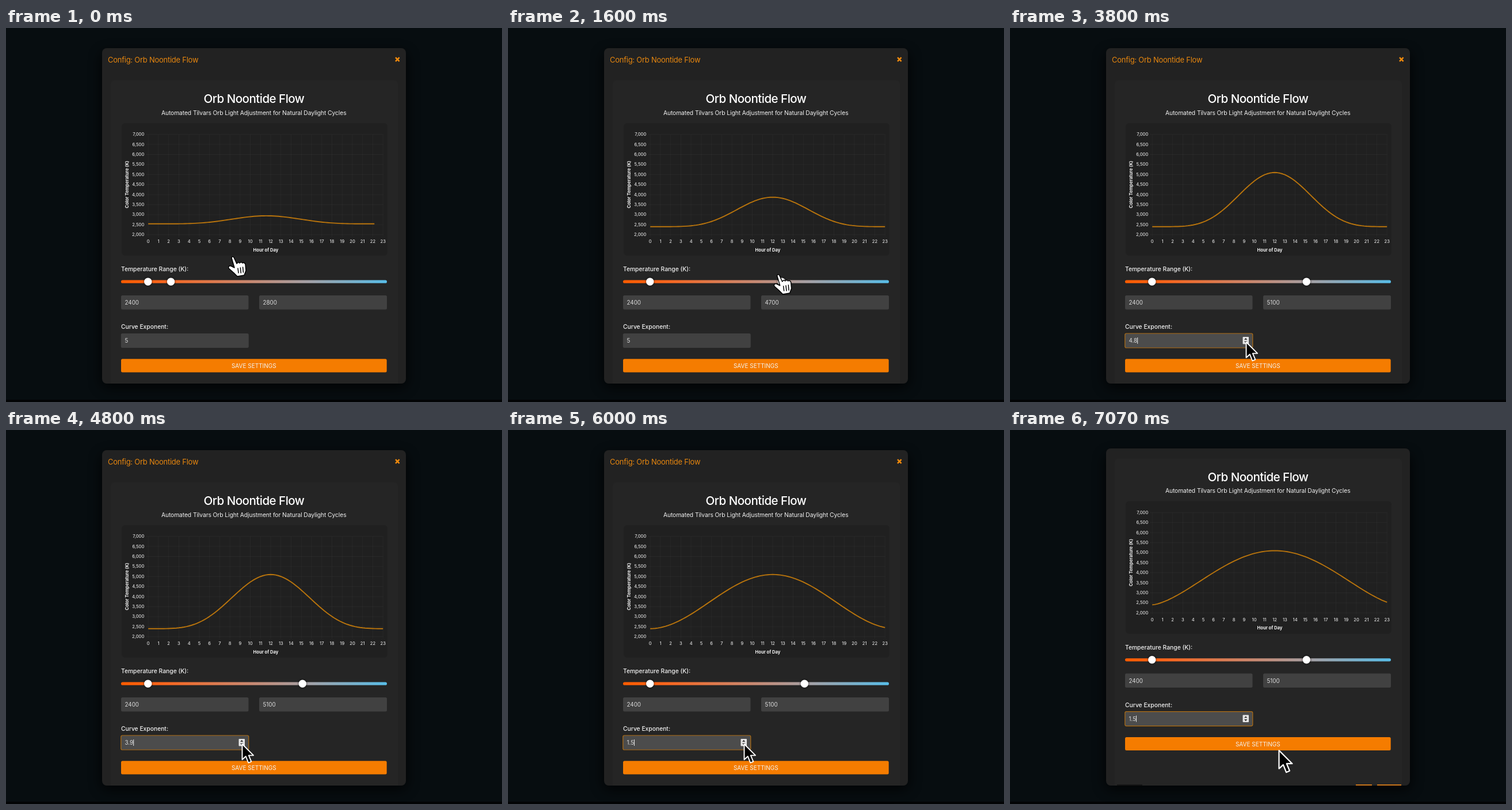
These frames come from a looping animation (862 by 649 pixels, 7.14 s). An HTML page:

```html
<!DOCTYPE html>
<html lang="en">
<head>
<meta charset="utf-8">
<title>Light settings</title>
<style>
  html, body { margin: 0; width: 100%; height: 100%; overflow: hidden; background: #070d10; }
  svg { display: block; width: 862px; height: 649px; font: 10px Inter, Roboto, sans-serif; fill: #f2f2f2; }
  .tick { font-size: 7.5px; font-weight: 500; fill: #dedede; }
  .axis { font-size: 7.6px; font-weight: 700; }
  .label { font-size: 10.3px; font-weight: 500; }
  .value { font-size: 9.8px; fill: #dcdcdc; }
  .mid { text-anchor: middle; }
  .end { text-anchor: end; }
  .box { fill: #414141; }
  .focus .expBox { fill: #4c4c4c; stroke: #b06d12; stroke-width: 1.2; }
</style>
</head>
<body>
<svg viewBox="0 0 862 649">
  <defs>
    <linearGradient id="warmCool">
      <stop offset="0" stop-color="#ff5c00"/>
      <stop offset=".15" stop-color="#fb651b"/>
      <stop offset=".45" stop-color="#cf8568"/>
      <stop offset=".7" stop-color="#a5a1a6"/>
      <stop offset="1" stop-color="#58bde8"/>
    </linearGradient>
    <filter id="shade" x="-20%" y="-20%" width="140%" height="140%"><feGaussianBlur stdDeviation="11"/></filter>
    <filter id="soft" x="-50%" y="-50%" width="200%" height="200%"><feGaussianBlur stdDeviation="1.6"/></filter>
    <clipPath id="frame"><rect class="modal" x="167" y="35" width="528" height="582" rx="8"/></clipPath>
    <path id="arrow" d="M0 0V27L6.3 21.3L10.8 32.5L15.8 30.3L11.3 19.6H19.6Z" fill="#000" stroke="#fff" stroke-width="1.9" stroke-linejoin="round"/>
    <g id="hand" stroke="#000" stroke-width="1.5" stroke-linejoin="round" stroke-linecap="round">
      <path fill="#fff" d="M-1 2Q0 -2 3 1L8 12Q11 8 13 11Q16 8 18 11Q21 9 23 13L24 24L21 32L9 34L3 28L-6 20Q-7 15 -2 16L4 19Z"/>
      <path fill="none" d="M10 20L11 28M14.3 19L15.3 28M18.6 18L19.4 27"/>
    </g>
  </defs>

  <rect y="645" width="862" height="4" fill="#020405"/>
  <rect x="165" y="42" width="532" height="582" rx="12" fill="#000" opacity=".75" filter="url(#shade)"/>
  <rect class="modal" x="167" y="35" width="528" height="582" rx="8" fill="#222"/>

  <g clip-path="url(#frame)">
    <g id="page">
      <text x="177" y="60" fill="#e8870f" font-size="12.9" letter-spacing="-.2">Config: Orb Noontide Flow</text>
      <path d="M677 51.2L683.6 57.8M683.6 51.2L677 57.8" stroke="#f28a0c" stroke-width="2.5"/>
      <rect x="182" y="91" width="499" height="600" rx="6" fill="#252525"/>
      <text class="mid" x="431" y="130" font-size="20.6" font-weight="500" letter-spacing="-.55" fill="#fff">Orb Noontide Flow</text>
      <text class="mid" x="430.7" y="150.6" font-size="10.3" letter-spacing="-.09">Automated Tilvars Orb Light Adjustment for Natural Daylight Cycles</text>

      <rect x="201" y="165" width="462" height="230" rx="6" fill="#202020"/>
      <path id="grid" stroke="#fff" stroke-opacity=".035"/>
      <g id="ticks"></g>
      <text class="axis mid" x="451.5" y="387.5">Hour of Day</text>
      <text class="axis mid" transform="translate(213.3 271.5) rotate(-90)">Color Temperature (K)</text>
      <path id="curve" fill="none" stroke="#b9740c" stroke-width="1.9" stroke-linejoin="round"/>

      <text class="label" x="200" y="422">Temperature Range (K):</text>
      <rect x="200" y="437.6" width="462" height="5.2" rx="2.6" fill="url(#warmCool)"/>
      <g class="thumb"><circle r="7.5" opacity=".5" fill="#000" filter="url(#soft)"/><circle r="6.7" fill="#fff"/></g>
      <g class="thumb"><circle r="7.5" opacity=".5" fill="#000" filter="url(#soft)"/><circle r="6.7" fill="#fff"/></g>
      <rect class="box" x="200" y="464" width="221.5" height="24.5" rx="2.5"/>
      <rect class="box" x="440" y="464" width="222" height="24.5" rx="2.5"/>
      <text class="value" x="206.5" y="480">2400</text>
      <text class="value" id="high" x="446.5" y="480"></text>

      <text class="label" x="200" y="522">Curve Exponent:</text>
      <g id="field">
        <rect class="box expBox" x="199.8" y="530" width="222" height="25" rx="2.5"/>
        <text class="value" id="exponent" x="206.5" y="546.2"></text>
        <rect id="caret" y="537" width="1" height="11" fill="#eee"/>
        <g id="spinner">
          <rect x="404.5" y="536" width="10.5" height="12.5" rx="1" fill="#e6e6e6"/>
          <path d="M407 541L409.7 537.8L412.4 541ZM407 543.5L409.7 546.7L412.4 543.5Z" fill="#333"/>
        </g>
      </g>
      <rect x="200" y="574.3" width="461.7" height="23.2" rx="2.5" fill="#f57c00"/>
      <text class="mid" x="430.8" y="590">SAVE SETTINGS</text>

      <path d="M186 656.5H230V680H186Z" fill="#151515"/>
      <path d="M601 656.5H629V680H601ZM638 656.5H680V680H638Z" fill="#c8741a"/>
    </g>
  </g>
  <use id="trail" href="#arrow"/>
  <use id="cursor"/>
</svg>

<script>
const LOOP = 7140, LOW = 2400;
const $ = id => document.getElementById(id);
const hourX = h => 247.2 + h * 17.74;
const kelvinY = k => 358.7 - (k - 2000) * 0.0348;
const thumbX = k => 207 + (k - 2000) / 4500 * 447.5;
const linear = p => p;
const smooth = p => p * p * (3 - 2 * p);

// Value at time t along [time, value] keys.
function track(keys, t, ease = linear) {
  if (t <= keys[0][0]) return keys[0][1];
  for (let i = 1; i < keys.length; i++) {
    const [t0, a] = keys[i - 1], [t1, b] = keys[i];
    if (t < t1) return a + (b - a) * ease((t - t0) / (t1 - t0));
  }
  return keys[keys.length - 1][1];
}

function buildAxes() {
  let grid = '', ticks = '';
  for (let k = 2000; k <= 7000; k += 500) {
    const y = kelvinY(k);
    grid += `M243 ${y}H655.5`;
    ticks += `<text class="tick end" x="240.3" y="${y + 2.5}">${k.toLocaleString('en-US')}</text>`;
  }
  for (let h = 0; h < 24; h++) {
    grid += `M${hourX(h)} 184.5V362`;
    ticks += `<text class="tick mid" x="${hourX(h)}" y="373.2">${h}</text>`;
  }
  $('grid').setAttribute('d', grid);
  $('ticks').innerHTML = ticks;
}

const highKeys = [[1050, 2800], [1600, 4700], [1850, 5100]];
const peakKeys = [[1100, 2800], [1600, 3867], [1850, 4700], [2100, 5040], [2350, 5100]];
const bendKeys = [[3550, 5], [3800, 4.93], [4400, 4.78], [4800, 4.3], [6000, 1.9], [6150, 1.62], [6400, 1.5]];
const scrollKeys = [[6450, 0], [6850, 1]];

const highAt = t => Math.round(track(highKeys, t) / 100) * 100;

function exponentAt(t) {
  if (t < 3500) return 5;
  if (t < 3750) return 4.9;
  return Math.max(1.5, 4.8 - 0.1 * Math.max(0, Math.floor((t - 4350) / 50)));
}

function cursorAt(t) {
  if (t < 1050) return [track([[60, 393], [750, 280]], t, smooth), track([[60, 397], [750, 428]], t, smooth)];
  if (t < 2450) return [thumbX(track(highKeys, t)) - 7, 428];
  return [
    track([[2480, 508], [2960, 410.5], [6200, 410.5], [6850, 467.5]], t, smooth),
    track([[2450, 450], [2940, 545], [6200, 545], [6850, 556]], t, smooth)
  ];
}

function drawCurve(t) {
  const settle = Math.max(0, 1 - t / 450) ** 4;
  const peak = track(peakKeys, t), bend = track(bendKeys, t);
  const points = [];
  for (let h = 0; h <= 23; h += 0.25) {
    const k = LOW + (peak - LOW) * Math.sin(Math.PI * h / 24) ** bend;
    points.push(`${hourX(h * (1 - 0.037 * settle)).toFixed(2)} ${(kelvinY(k) - 5 * settle).toFixed(2)}`);
  }
  $('curve').setAttribute('d', 'M' + points.join('L'));
}

function drawCursor(t) {
  const [x, y] = cursorAt(t), [px, py] = cursorAt(t - 35);
  const isArrow = t >= 2450;
  const blurred = t > 2500 && Math.hypot(x - px, y - py) > 5;
  const size = track([[6200, 1], [6850, 1.17]], t);
  const cursor = $('cursor'), trail = $('trail');
  cursor.setAttribute('href', isArrow ? '#arrow' : '#hand');
  cursor.setAttribute('transform', `translate(${x} ${y}) scale(${size})`);
  cursor.setAttribute('opacity', blurred ? 0.6 : 1);
  trail.setAttribute('transform', `translate(${px} ${py})`);
  trail.setAttribute('opacity', blurred ? 0.5 : 0);
}

const thumbs = document.querySelectorAll('.thumb');
const modals = document.querySelectorAll('.modal');

function draw(t) {
  const scroll = track(scrollKeys, t, smooth);
  $('page').setAttribute('transform', `translate(0 ${-41.4 * scroll})`);
  modals.forEach(m => {
    m.setAttribute('y', 35 - 3 * scroll);
    m.setAttribute('height', 582 + 3 * scroll);
  });

  const high = highAt(t), focused = t >= 3500;
  [LOW, high].forEach((k, i) => thumbs[i].setAttribute('transform', `translate(${thumbX(k)} 440.2)`));
  $('high').textContent = high;

  const text = $('exponent');
  text.textContent = +exponentAt(t).toFixed(1);
  $('field').setAttribute('class', focused ? 'focus' : '');
  $('caret').setAttribute('x', 206.5 + text.getComputedTextLength());
  $('caret').setAttribute('opacity', focused ? 1 : 0);
  $('spinner').setAttribute('opacity', t >= 2900 ? 1 : 0);

  drawCurve(t);
  drawCursor(t);
}

buildAxes();
const start = performance.now();
function tick() {
  draw((performance.now() - start) % LOOP);
  requestAnimationFrame(tick);
}
tick();
</script>
</body>
</html>
```
